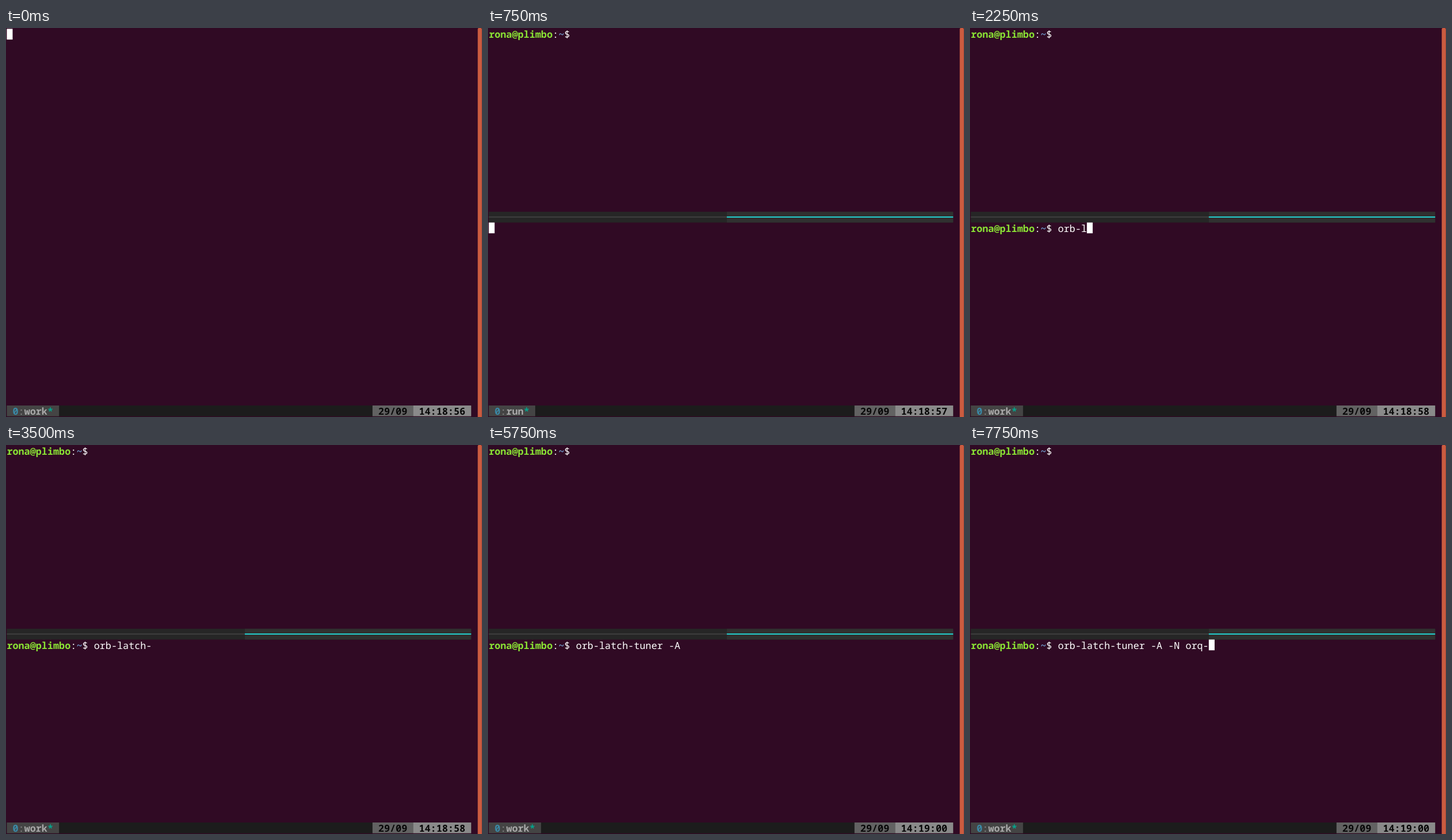
An HTML page for the animation above (8000 ms loop, 827 px wide and 677 px high).

```html
<!DOCTYPE html>
<html lang="en">
<head>
<meta charset="utf-8">
<title>Terminal session</title>
<style>
  html, body { margin: 0; width: 100%; height: 100%; overflow: hidden; background: #300a24; }
  svg { display: block; width: 827px; height: 677px; }
  text {
    font: 16.81px "Noto Sans Mono", "DejaVu Sans Mono", monospace;
    text-rendering: geometricPrecision;
    white-space: pre;
  }
  .bold { font-weight: 700; }
</style>
</head>
<body>
<svg id="screen" viewBox="0 0 827 677"></svg>
<script>
const LOOP = 8000, STEP = 250;
const COLUMN = 10.085, ROW = 18.73;
const PANE_ROW = 18, BORDER_ROW = 17, STATUS_ROW = 35;
const USER = "rona@plimbo";
const COMMAND = "orb-latch-tuner -A -N orq-";
const PROMPT_LENGTH = USER.length + 4;

const screen = document.getElementById("screen");
const columnX = column => 1.4 + column * COLUMN;
const rowY = row => 1.4 + row * ROW;

const rect = (x, y, width, height, fill, extra = "") =>
  `<rect x="${x}" y="${y}" width="${width}" height="${height}" fill="${fill}" ${extra}/>`;

const cells = (column, row, count, fill) =>
  rect(columnX(column), rowY(row), count * COLUMN, ROW, fill);

const label = (column, row, content, fill, bold = false) =>
  `<text x="${columnX(column)}" y="${rowY(row) + 16}" fill="${fill}"${bold ? ' class="bold"' : ""}>${content}</text>`;

const cursor = (column, row) => cells(column, row, 1, "#fff");

const prompt = row =>
  label(0, row, USER, "#8ae234", true) +
  label(USER.length, row, ":", "#fff") +
  label(USER.length + 1, row, "~", "#729fcf", true) +
  label(USER.length + 2, row, "$", "#fff");

function border() {
  const left = columnX(0), middle = columnX(41), right = columnX(80);
  const y = rowY(BORDER_ROW) + 8.3;
  return cells(0, BORDER_ROW, 80, "#262626") +
    cells(41, BORDER_ROW, 39, "#303030") +
    rect(left, y + 0.2, middle - left, 1.3, "#4a4a4a") +
    rect(middle, y, right - middle, 1.8, "#22e0e0");
}

function status(name, time) {
  const tabWidth = name.length + 5;
  return cells(0, STATUS_ROW, 80, "#1c1c1c") +
    cells(0, STATUS_ROW, tabWidth, "#444") +
    label(1, STATUS_ROW, "0", "#3a8aa8", true) +
    label(2, STATUS_ROW, ":", "#8a8a8a") +
    label(3, STATUS_ROW, name, "#a8a8a8", true) +
    label(3 + name.length, STATUS_ROW, "*", "#00a88f", true) +
    cells(63, STATUS_ROW, 7, "#626262") +
    cells(70, STATUS_ROW, 10, "#8a8a8a") +
    label(64, STATUS_ROW, "29/09", "#080808", true) +
    label(71, STATUS_ROW, time, "#080808", true);
}

function lowerPane(step) {
  if (step < 4) return cursor(0, PANE_ROW);
  // One key per step, with a short hesitation before the second option.
  const typed = step - 4 - (step >= 24);
  const blinkedOff = step === 14 || (step >= 23 && step <= 27);
  return prompt(PANE_ROW) +
    label(PROMPT_LENGTH, PANE_ROW, COMMAND.slice(0, typed), "#fff") +
    (blinkedOff ? "" : cursor(PROMPT_LENGTH + typed, PANE_ROW));
}

function picture(step) {
  const split = step >= 2;
  const name = step >= 3 && step < 8 ? "run" : "work";
  const time = step < 3 ? "14:18:56" : step < 8 ? "14:18:57" : step < 23 ? "14:18:58" : "14:19:00";
  return rect(0, 0, 827, 677, "#300a24") +
    rect(819.6, 0, 7.2, 681, "#cb5c40", 'rx="2"') +
    (step > 0 ? prompt(0) : "") +
    (split ? border() + lowerPane(step) : cursor(step > 0 ? PROMPT_LENGTH : 0, 0)) +
    status(name, time);
}

let shownStep = -1;
const start = performance.now();

function render() {
  const step = Math.floor(((performance.now() - start) % LOOP) / STEP);
  if (step !== shownStep) {
    screen.innerHTML = picture(step);
    shownStep = step;
  }
  requestAnimationFrame(render);
}
render();
</script>
</body>
</html>
```
